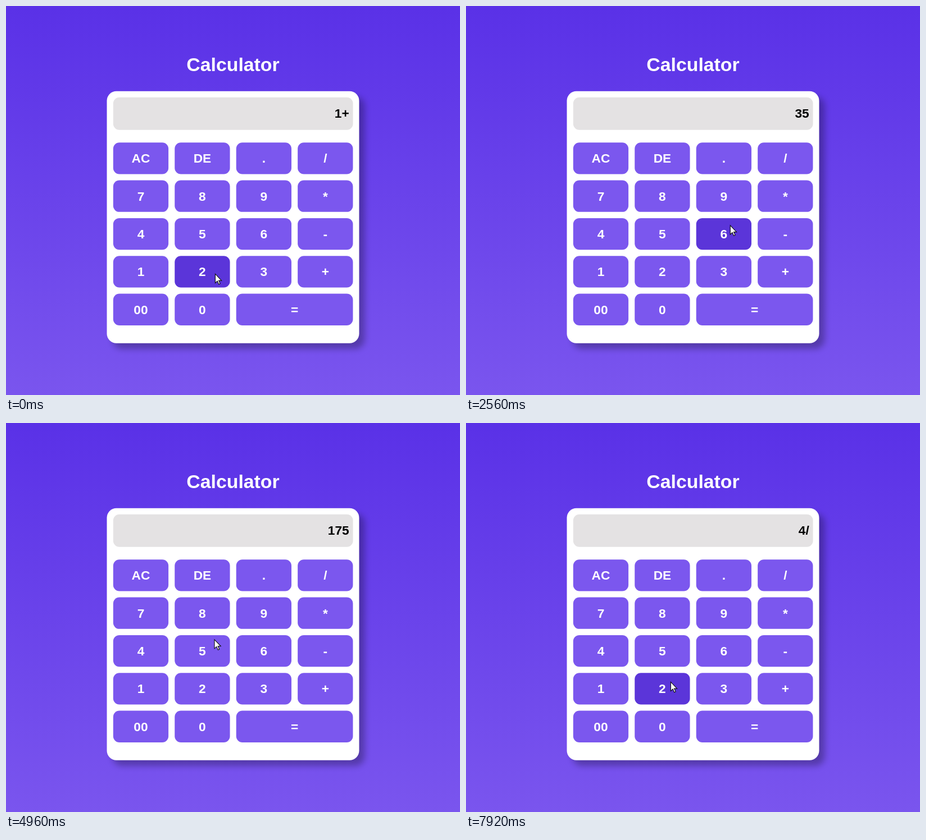
These frames come from a looping animation (808 px wide and 693 px high, 8000 ms). An HTML page:

```html
<!DOCTYPE html>
<html lang="en">
<head>
<meta charset="utf-8">
<title>Calculator</title>
<style>
html, body { margin: 0; width: 100%; height: 100%; overflow: hidden; background: #6a42ea; }
svg { display: block; width: 808px; height: 693px; }
text { font: bold 22.7px "Liberation Sans", Arial, sans-serif; fill: #fff; text-anchor: middle; }
#title { font-size: 33.8px; }
#display { fill: #000; text-anchor: end; }
.key { fill: #7b57ee; }
.key.hover { fill: #5b35d9; }
</style>
</head>
<body>
<svg viewBox="0 0 808 693">
  <defs>
    <linearGradient id="sky" x2="0" y2="1">
      <stop offset="0" stop-color="#5a31e7"/>
      <stop offset="1" stop-color="#7a55ee"/>
    </linearGradient>
    <filter id="blur" x="-10%" y="-10%" width="120%" height="120%">
      <feGaussianBlur stdDeviation="6"/>
    </filter>
  </defs>
  <rect width="808" height="693" fill="url(#sky)"/>
  <text id="title" x="404" y="115.5">Calculator</text>
  <rect x="189.5" y="161.8" width="449" height="449" rx="17" fill="#000" opacity=".28" filter="url(#blur)"/>
  <rect x="179.5" y="151.8" width="449" height="449" rx="17" fill="#fff"/>
  <rect x="190.8" y="162.7" width="426.8" height="58" rx="11" fill="#e4e2e3"/>
  <text id="display" x="610.7" y="199"></text>
  <g id="keys"></g>
  <path id="cursor" d="M0 0V16L3.7 12.6 6.3 18.4 8.7 17.4 6.2 11.7H11.2Z" fill="#fff" stroke="#111" stroke-width="1.1"/>
</svg>
<script>
const LOOP = 8000, STEP = 80;
const LEFT = 190.8, TOP = 243.2, PITCH_X = 109.45, PITCH_Y = 67.35, KEY_W = 98.3, KEY_H = 56.3;
const LABELS = ['AC DE . /', '7 8 9 *', '4 5 6 -', '1 2 3 +', '00 0 ='];
const START_TEXT = '1+';

// The pointer's visits, offset from the key's centre. It presses one step
// before leaving; with no stay it only passes. "bow" bends the way there.
const VISITS = [
  { key: '2', arrive: 0, leave: 320, off: [23, 4] },
  { key: '=', arrive: 720, leave: 1040, off: [0, -18] },
  { key: '5', arrive: 1760, leave: 2080, off: [-16, -6], bow: [6, -209] },
  { key: '*', arrive: 2800, leave: 2960, off: [-6, 8], bow: [-85, 79] },
  { key: '5', arrive: 3280, leave: 3520, off: [16, 0] },
  { key: '=', arrive: 3840, leave: 4400, off: [0, -27] },
  { key: 'AC', arrive: 5440, leave: 5680, off: [18, 13] },
  { key: '4', arrive: 5920, leave: 6160, off: [10, 0] },
  { key: '-', arrive: 6640, leave: 6640, off: [-25, 27] },
  { key: '/', arrive: 7040, leave: 7280, off: [4, 13] },
  { key: '2', arrive: 7840, leave: LOOP + 160, off: [15, -12] }
];

const OPS = {
  '+': (a, b) => a + b,
  '-': (a, b) => a - b,
  '*': (a, b) => a * b,
  '/': (a, b) => a / b
};

const byId = id => document.getElementById(id);
const display = byId('display'), cursor = byId('cursor');

function add(tag, attrs, content = '') {
  const el = document.createElementNS('http://www.w3.org/2000/svg', tag);
  for (const name in attrs) el.setAttribute(name, attrs[name]);
  el.textContent = content;
  byId('keys').append(el);
  return el;
}

const keys = LABELS.flatMap((line, row) => line.split(' ').map((label, col) => {
  const x = LEFT + col * PITCH_X, y = TOP + row * PITCH_Y;
  const w = label === '=' ? KEY_W + PITCH_X : KEY_W;
  const el = add('rect', { x, y, width: w, height: KEY_H, rx: 11, class: 'key' });
  add('text', { x: x + w / 2, y: y + 36 }, label);
  return { label, x, y, w, el };
}));

for (const v of VISITS) {
  const k = keys.find(({ label }) => label === v.key);
  v.at = [k.x + k.w / 2 + v.off[0], k.y + KEY_H / 2 + v.off[1]];
}

function pointerAt(t) {
  const i = Math.max(0, VISITS.findLastIndex(v => v.arrive <= t));
  const from = VISITS[i], to = VISITS[i + 1];
  if (!to || t <= from.leave) return from.at;
  const u = (t - from.leave) / (to.arrive - from.leave);
  const e = u * u * (3 - 2 * u);
  const bow = to.bow || [0, 0];
  return from.at.map((a, axis) =>
    a + (to.at[axis] - a) * e + 2 * e * (1 - e) * bow[axis]);
}

function press(text, key) {
  if (key === 'AC') return '';
  if (key !== '=') return text + key;
  const [, a, op, b] = text.match(/(\d+)(\D)(\d+)/);
  return String(OPS[op](+a, +b));
}

const textAt = t => VISITS
  .filter(v => v.leave > v.arrive && v.leave - STEP <= t)
  .reduce((text, v) => press(text, v.key), START_TEXT);

function draw(time) {
  const t = Math.floor(time % LOOP / STEP) * STEP;
  const [x, y] = pointerAt(t);
  cursor.setAttribute('transform', `translate(${x.toFixed(1)} ${y.toFixed(1)})`);
  display.textContent = textAt(t);
  // Key highlights trail the pointer by one step
  const [hx, hy] = pointerAt(t - STEP);
  for (const k of keys) {
    const inside = hx >= k.x && hx <= k.x + k.w && hy >= k.y && hy <= k.y + KEY_H;
    k.el.classList.toggle('hover', inside);
  }
}

const begin = performance.now();
function tick() {
  draw(performance.now() - begin);
  requestAnimationFrame(tick);
}
tick();
</script>
</body>
</html>
```
